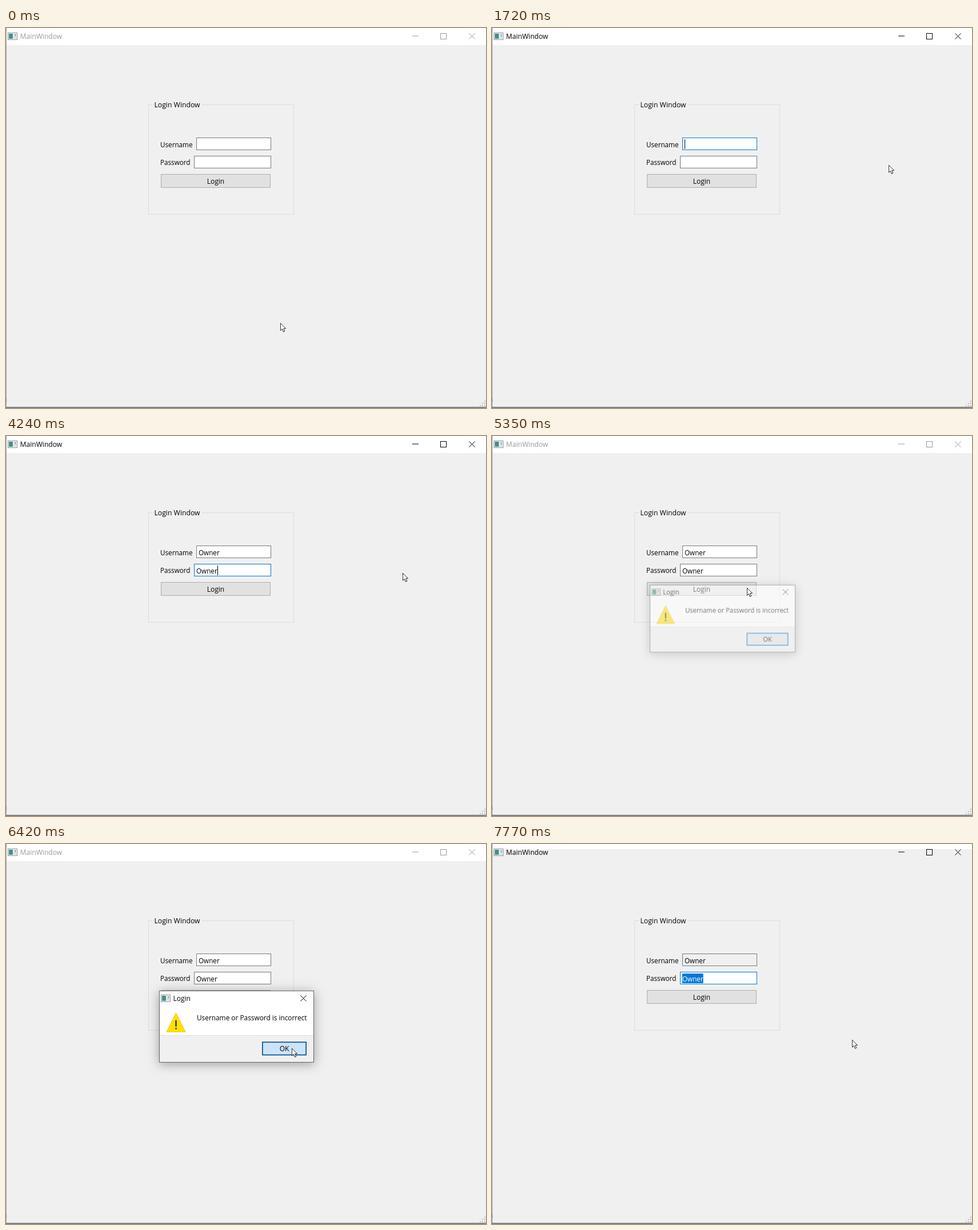
Recreate the animation shown at these times as an HTML page with a canvas. Size 840 by 666 pixels, loop 8000 ms.

```html
<!DOCTYPE html>
<html lang="en">
<head>
<meta charset="utf-8">
<title>MainWindow</title>
<style>
  html, body { margin: 0; height: 100%; overflow: hidden; background: #f0f0f0; }
  canvas { display: block; }
</style>
</head>
<body>
<canvas id="stage" width="840" height="666"></canvas>
<script>
const stage = document.getElementById('stage').getContext('2d');
const layer = Object.assign(document.createElement('canvas'), { width: 840, height: 666 }).getContext('2d');
let ctx = stage;
const LOOP = 8000;
const GREY = '#f0f0f0', BLUE = '#0078d7', DARK = '#171717';
const NAME = 'Owner';

// Screen capture: each step holds until the next one and changes only what it lists.
const steps = [
  [0, { x: 480, y: 517, beam: false, active: false, greyed: false, button: 'idle', focus: '', hover: '',
        user: 0, pass: 0, caret: false, selected: 0, dialog: 0, scale: 1, ok: 'default' }],
  [420, { x: 440, y: 425 }],
  [550, { x: 392, y: 337 }],
  [690, { x: 378, y: 272, button: 'hover' }],
  [820, { x: 368, y: 238, beam: true, button: 'idle', hover: 'pass' }],
  [940, { x: 364, y: 227 }],
  [1090, { x: 362, y: 204, hover: 'user' }],
  [1210, { active: true, focus: 'user', caret: true }],
  [1340, { x: 410, y: 208 }],
  [1470, { x: 560, y: 222, beam: false, hover: '' }],
  [1600, { x: 670, y: 237 }],
  [1720, { x: 694, y: 240 }],
  [2310, { user: 1 }],
  [2460, { user: 2 }],
  [2610, { user: 4 }],
  [2780, { user: 5 }],
  [2910, { focus: 'pass' }],
  [3510, { caret: false }],
  [3780, { pass: 1, caret: true }],
  [3930, { pass: 2 }],
  [4080, { pass: 4 }],
  [4240, { pass: 5 }],
  [4800, { x: 632, y: 249, caret: false }],
  [4950, { x: 480, y: 261 }],
  [5100, { x: 446, y: 266, button: 'hover' }],
  [5220, { button: 'pressed', focus: 'button' }],
  [5350, { button: 'idle', focus: '', active: false, dialog: 0.5, scale: 0.94 }],
  [5470, { x: 505, y: 318, dialog: 0.9, scale: 0.98 }],
  [5590, { x: 548, y: 354, dialog: 1, scale: 0.995 }],
  [5750, { scale: 1 }],
  [6180, { x: 500, y: 358, ok: 'hover' }],
  [6310, { ok: 'pressed' }],
  [6430, { active: true, greyed: true, focus: 'button', dialog: 0.6, scale: 0.96 }],
  [6540, { x: 465, y: 325, dialog: 0.15, scale: 0.92 }],
  [6690, { x: 438, y: 293, dialog: 0 }],
  [6810, { x: 412, y: 273, button: 'hover' }],
  [6960, { x: 388, y: 238, beam: true, button: 'idle', hover: 'pass' }],
  [7090, { x: 376, y: 230, focus: 'pass', caret: true }],
  [7210, { x: 346, y: 225, selected: 3 }],
  [7350, { x: 262, y: 232, selected: 5, hover: '' }],
  [7500, { x: 470, y: 290, beam: false }],
  [7630, { x: 630, y: 343 }],
  [7770, { caret: false }]
];

function stateAt(time) {
  return Object.assign({}, ...steps.filter(([start]) => start <= time).map(([, change]) => change));
}

function text(string, x, y, size = 11.7, color = '#000', align = 'left') {
  ctx.font = `${size}px "Open Sans", "Noto Sans", sans-serif`;
  ctx.fillStyle = color;
  ctx.textAlign = align;
  ctx.fillText(string, x, y);
}

function fill(color, x, y, w, h) {
  ctx.fillStyle = color;
  ctx.fillRect(x, y, w, h);
}

function box(x, y, w, h, background, border, line = 1) {
  fill(border, x, y, w, h);
  fill(background, x + line, y + line, w - 2 * line, h - 2 * line);
}

function path(points, color, closed = false, width = 1) {
  ctx.beginPath();
  points.forEach(([x, y]) => ctx.lineTo(x, y));
  if (closed) ctx.closePath();
  ctx.strokeStyle = color;
  ctx.lineWidth = width;
  ctx.stroke();
}

function cross(x, y, color) {
  path([[x, y], [x + 10, y + 10]], color);
  path([[x, y + 10], [x + 10, y]], color);
}

function appIcon(x, y) {
  box(x, y, 17, 13, '#fafafa', '#8b9297');
  const panel = ctx.createLinearGradient(x, y, x + 9, y + 11);
  panel.addColorStop(0, '#47758a');
  panel.addColorStop(1, '#43a183');
  fill(panel, x + 2, y + 2, 7, 9);
  fill('#d9dde0', x + 10, y + 2, 5, 9);
  fill('#69747c', x + 13, y + 3, 1, 3);
}

function windowFrame(s) {
  fill(GREY, 0, 0, 840, 666);
  fill('#fff', 0, 0, 840, s.greyed ? 9 : 30);
  const ink = s.active ? '#000' : '#999';
  appIcon(3, 8);
  text('MainWindow', 24.5, 19, 12.1, ink);
  fill(ink, 711, 13.5, 11, 1);
  ctx.strokeStyle = ink;
  ctx.lineWidth = 1;
  ctx.strokeRect(760.5, 9.5, 10, 10);
  cross(810.5, 9.5, ink);

  fill('#a6a6a6', 0, 0, 1, 665);
  fill('#777', 0, 649, 1, 6);
  fill('#fafafa', 1, 663, 839, 1);
  fill('#555', 0, 664, 840, 1);
  fill('#a6a6a6', 0, 665, 840, 1);
  for (let row = 0; row < 3; row++)
    for (let col = 0; col <= row; col++)
      fill('#b8b8b8', 837 - col * 4, 653 + row * 4, 2, 2);
}

function field(s, id, x, y, w, textX) {
  const focused = s.focus === id;
  const border = s.hover === id ? DARK : focused ? BLUE : '#7a7a7a';
  box(x, y, w, 22, s.greyed && !focused ? GREY : '#fff', border);
  const value = NAME.slice(0, s[id]);
  const baseline = y + 17;
  text(value, textX, baseline);
  const widthOf = n => ctx.measureText(value.slice(0, n)).width;
  let caretX = textX + widthOf(value.length);
  if (focused && s.selected) {
    const kept = value.length - s.selected;
    const start = textX + widthOf(kept);
    fill(BLUE, start, y + 3, caretX - start, 17);
    text(value.slice(kept), start, baseline, 11.7, '#fff');
    caretX = start;
  }
  if (focused && s.caret) fill('#000', Math.round(caretX), y + 3, 1, 17);
}

const buttonLooks = {
  idle: ['#e1e1e1', '#adadad'],
  default: ['#e1e1e1', BLUE],
  hover: ['#e5f1fb', BLUE],
  pressed: ['#cce4f7', '#005499']
};

function loginForm(s) {
  ctx.strokeStyle = '#dcdcdc';
  ctx.lineWidth = 1;
  ctx.strokeRect(249.5, 134.5, 254, 192);
  fill(GREY, 258, 133, 85, 3);
  text('Login Window', 259.5, 139, 12.2);
  text('Username', 270, 209);
  text('Password', 270, 240);
  field(s, 'user', 333, 192, 131, 337);
  field(s, 'pass', 329, 224, 135, 333);
  box(271, 256, 192, 24, ...buttonLooks[s.button]);
  if (s.focus === 'button') {
    ctx.strokeStyle = '#000';
    ctx.setLineDash([1, 1]);
    ctx.strokeRect(273, 258, 188, 20);
    ctx.setLineDash([]);
  }
  text('Login', 367, 273, 12, '#000', 'center');
}

function dialogWindow(s) {
  ctx.shadowColor = 'rgba(0,0,0,.34)';
  ctx.shadowBlur = 18;
  ctx.shadowOffsetY = 3;
  fill('#666', 268, 257, 271, 126);
  ctx.shadowColor = 'transparent';
  fill('#fff', 269, 258, 269, 77);
  fill('#dfdfdf', 269, 335, 269, 1);
  fill(GREY, 269, 336, 269, 46);
  appIcon(271, 264);
  text('Login', 292.5, 275, 12);
  cross(515.5, 265.5, '#000');

  const triangle = [[297.5, 297], [313.5, 329], [281.5, 329]];
  path(triangle, '#f2b90c', true, 1.5);
  ctx.fillStyle = '#ffe000';
  ctx.fill();
  fill('#111', 296.5, 309, 2, 11);
  fill('#111', 296.5, 322, 2, 2.5);
  text('Username or Password is incorrect', 334, 309, 11.85);
  box(448, 346.5, 78, 24, ...buttonLooks[s.ok], 1.7);
  text('OK', 487, 363, 12, '#000', 'center');
}

// Painted on its own layer so that it fades as one piece.
function dialog(s) {
  if (!s.dialog) return;
  ctx = layer;
  ctx.clearRect(0, 0, 840, 666);
  dialogWindow(s);
  ctx = stage;
  ctx.save();
  ctx.globalAlpha = s.dialog;
  ctx.translate(403.5, 320);
  ctx.scale(s.scale, s.scale);
  ctx.drawImage(layer.canvas, -403.5, -320);
  ctx.restore();
}

function pointer({ x, y, beam }) {
  ctx.save();
  ctx.translate(x, y);
  if (beam) {
    fill('#000', -0.5, -6, 1, 12);
    for (const edge of [-7, 6]) {
      fill('#000', -3, edge, 2.5, 1);
      fill('#000', 0.5, edge, 2.5, 1);
    }
  } else {
    const arrow = [[0.5, 0.5], [0.5, 13], [3.4, 10.4], [5.5, 15.3], [7.6, 14.4], [5.6, 9.7], [9.5, 9.5]];
    path(arrow, '#000', true, 0.9);
    ctx.fillStyle = '#fff';
    ctx.fill();
    path(arrow, '#000', true, 0.6);
  }
  ctx.restore();
}

function draw() {
  const s = stateAt(performance.now() % LOOP);
  windowFrame(s);
  loginForm(s);
  dialog(s);
  pointer(s);
  requestAnimationFrame(draw);
}
draw();
</script>
</body>
</html>
```
